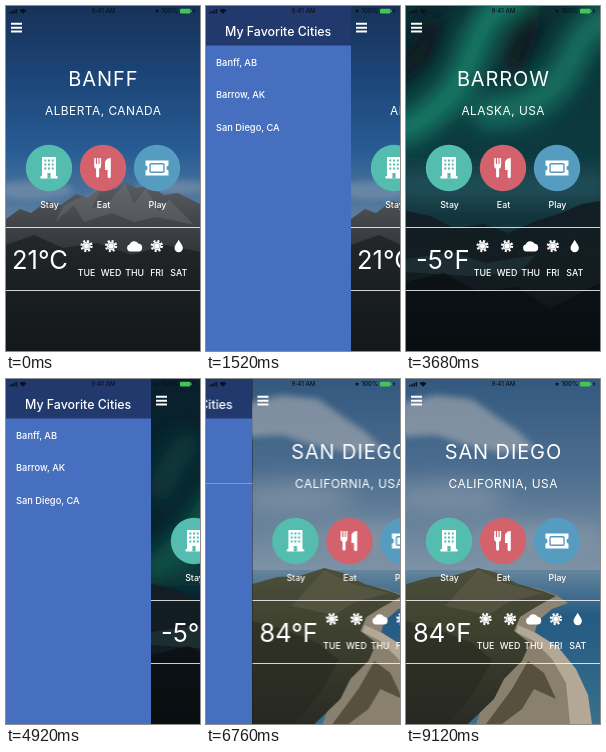
An HTML page that plays this animation: 194 px wide and 345 px high, repeating every 9.16 s.

```html
<!DOCTYPE html>
<html lang="en">
<head>
<meta charset="utf-8">
<title>City weather</title>
<style>
  html, body { margin: 0; width: 100%; height: 100%; overflow: hidden; background: #101820; }
  svg { display: block; width: 100vw; height: 100vh; }
  text { font-family: Inter, "Open Sans", sans-serif; fill: #fff; }
  .mid { text-anchor: middle; }
  .name { font-size: 20px; letter-spacing: .045em; }
  .region { font-size: 11.9px; letter-spacing: .04em; }
  .temp { font-size: 25.5px; }
  .small { font-size: 8.8px; font-weight: 500; }
  .title { font-size: 12.4px; font-weight: 500; }
  .row { font-size: 9.3px; font-weight: 500; }
  .status text { font-size: 6.2px; font-weight: 500; fill: #0a1220; }
</style>
</head>
<body>
<svg viewBox="0 0 194 345" preserveAspectRatio="none">
  <defs>
    <filter id="soft" x="-50%" y="-50%" width="200%" height="200%"><feGaussianBlur stdDeviation="11"/></filter>
    <filter id="haze" x="-20%" y="-20%" width="140%" height="140%"><feGaussianBlur stdDeviation="3"/></filter>
    <linearGradient id="alpineSky" x2="0" y2="1">
      <stop stop-color="#173258"/><stop offset=".2" stop-color="#1c4477"/>
      <stop offset=".42" stop-color="#285c94"/><stop offset=".6" stop-color="#5a7c9d"/>
    </linearGradient>
    <linearGradient id="rock" x2="0" y2="1">
      <stop stop-color="#5a5d62"/><stop offset=".3" stop-color="#3b3e42"/>
      <stop offset=".62" stop-color="#24282a"/><stop offset="1" stop-color="#131617"/>
    </linearGradient>
    <linearGradient id="night" x2="0" y2="1">
      <stop stop-color="#0b2e34"/><stop offset=".4" stop-color="#0c3a3e"/>
      <stop offset=".65" stop-color="#14323a"/><stop offset="1" stop-color="#0a1216"/>
    </linearGradient>
    <linearGradient id="shore" x2="0" y2="1">
      <stop stop-color="#121f26"/><stop offset=".5" stop-color="#131c20"/><stop offset="1" stop-color="#0a1013"/>
    </linearGradient>
    <linearGradient id="coastSky" x2="0" y2="1">
      <stop stop-color="#34597f"/><stop offset=".25" stop-color="#4a6c8e"/><stop offset=".55" stop-color="#7d92a5"/>
    </linearGradient>
    <linearGradient id="sea" x2="0" y2="1">
      <stop stop-color="#64859c"/><stop offset=".3" stop-color="#255a82"/><stop offset="1" stop-color="#37708c"/>
    </linearGradient>
    <linearGradient id="hill" x2="0" y2="1">
      <stop stop-color="#4c4f3c"/><stop offset=".4" stop-color="#3f412f"/><stop offset="1" stop-color="#2a2b24"/>
    </linearGradient>

    <g id="sun" fill="#fff">
      <circle r="4.2"/>
      <circle r="5" fill="none" stroke="#fff" stroke-width="2.3" stroke-dasharray="2 1.927"/>
      <circle r="3" fill="none" stroke="#000" stroke-opacity=".35" stroke-width=".8"/>
    </g>
    <path id="cloud" fill="#fff" d="M-4.5 5.5a3.6 3.6 0 0 1-.6-7A5 5 0 0 1 4-2.2a3.9 3.9 0 0 1 .4 7.7z"/>
    <path id="drop" fill="#fff" d="M0-6.2C1.5-3 4.2-.8 4.2 2A4.2 4.2 0 0 1-4.2 2C-4.2-.8-1.5-3 0-6.2z"/>
    <path id="burger" stroke="#fff" stroke-width="2" d="M5 17.8h11M5 21.7h11M5 25.6h11"/>

    <g id="Stay">
      <path fill="#fff" d="M-7-11H7v19H8.5v2.5H-8.5V8H-7z"/>
      <path stroke="#55bdb0" stroke-width="2" stroke-dasharray="2 1.7" d="M-4.7-7.5H4.7M-4.7-3.5H4.7M-4.7.5H4.7"/>
      <path fill="#55bdb0" d="M-1.6 5h3.2v5.5h-3.2z"/>
    </g>
    <g id="Eat" fill="#fff">
      <path d="M-8.6-10h1.5v6h1.1v-6h1.5v6h1.1v-6h1.5v7.5q0 2.5-2 3.2V8.6a1.6 1.6 0 0 1-3 0V.7q-2-.7-2-3.2z"/>
      <path d="M2-6q1.5-4 5.8-4V8.6a1.6 1.6 0 0 1-3.2 0V2H2z"/>
    </g>
    <g id="Play">
      <path fill="#fff" d="M-11.5-7.5h23v4.8a2.8 2.8 0 0 0 0 5.4v4.8h-23V2.7a2.8 2.8 0 0 0 0-5.4z"/>
      <rect x="-7" y="-4.3" width="14" height="8.6" rx="1" fill="none" stroke="#559cc0" stroke-width="1.4"/>
    </g>
  </defs>

  <g id="strip">
    <g class="city">
      <path fill="url(#alpineSky)" d="M0 0h194v345H0z"/>
      <g filter="url(#haze)" fill="#8da2b5" opacity=".45">
        <ellipse cx="25" cy="184" rx="42" ry="9"/><ellipse cx="168" cy="181" rx="38" ry="7"/>
      </g>
      <path fill="url(#rock)" d="M0 213 14 203 25 207 41 195 55 199 70 188 82 192 96 180 110 183 119 176 130 182 143 179 158 189 172 187 194 198V345H0z"/>
      <path fill="#777a7d" opacity=".35" d="M96 181 86 202 102 197 119 177 128 198 140 182 153 205 163 193 188 219 151 211 128 216 106 207 78 216 68 199 49 216 58 199z"/>
      <path fill="#15191b" opacity=".6" d="M0 239 28 229 57 242 91 237 126 249 160 239 194 246V345H0z"/>
    </g>
    <g class="city">
      <path fill="url(#night)" d="M0 0h194v345H0z"/>
      <g filter="url(#soft)" fill="none" stroke-linecap="round">
        <path stroke="#178069" stroke-width="27" d="M-5 125Q48 103 66 48T112-8"/>
        <path stroke="#147262" stroke-width="30" d="M80 106Q142 105 165 54T208 15"/>
        <path stroke="#07191f" stroke-width="24" d="M25 22Q14 60-14 67M124 12 108 58"/>
        <path stroke="#20505a" stroke-width="30" d="M0 180H194"/>
      </g>
      <g id="darkSky">
        <path fill="#08212c" d="M0 0h194v345H0z"/>
        <g filter="url(#soft)" fill="none" stroke-linecap="round">
          <path stroke="#0c5a48" stroke-width="26" d="M0 192Q34 168 55 134T128 48"/>
          <path stroke="#0a3d3c" stroke-width="24" d="M10 110Q22 80 36 66M20 195H194"/>
        </g>
      </g>
      <path fill="url(#shore)" d="M0 205 24 210 48 222 78 218 102 227 130 215 155 207 176 198 194 195V345H0z"/>
      <path fill="#294047" opacity=".45" d="M0 253 46 246 80 257 130 249 113 267 62 270 0 266z"/>
      <path fill="#080e11" opacity=".75" d="M0 276 38 267 72 286 112 281 143 303 194 277V345H0z"/>
    </g>
    <g class="city">
      <path fill="url(#coastSky)" d="M0 0h194v345H0z"/>
      <g filter="url(#haze)" fill="#a3a9b0" opacity=".65">
        <path d="M-5 24 30 16 66 20 88 36 112 52 130 70 96 74 60 66 30 56-5 58z"/>
      </g>
      <g filter="url(#soft)" fill="#a0a7b0" opacity=".45">
        <ellipse cx="42" cy="118" rx="60" ry="15"/><ellipse cx="132" cy="158" rx="72" ry="13"/>
      </g>
      <path fill="url(#sea)" d="M0 191h194v154H0z"/>
      <path fill="#8d8474" d="M100 206 130 209 150 216 162 224 146 230 132 242 128 256 106 256z"/>
      <path fill="#b3a896" d="M112 246 130 254 152 268 170 290 182 316 186 345H84z"/>
      <path fill="#8a806e" d="M104 250 128 262 146 280 160 304 164 345H70z"/>
      <path fill="url(#hill)" d="M0 205 25 198 47 197 72 189 91 194 112 205 137 212 150 217 130 228 114 238 108 252 124 264 116 282 98 300 88 320 62 345H0z"/>
      <path fill="#57503f" d="M122 282 138 294 150 320 128 310 116 330 96 345H80L106 310z"/>
      <path fill="#62604a" opacity=".5" d="M72 191 98 204 137 214 103 223 82 236 39 227z"/>
      <path fill="#26271f" opacity=".55" d="M0 242 31 250 66 264 86 281 69 312 42 345H0z"/>
    </g>
    <g id="menu">
      <path fill="#466fc0" d="M-145 0H0V345H-145z"/>
      <path fill="#21396d" d="M-145 0H0V39.5H-145z"/>
      <text class="title" x="-126" y="29.5">My Favorite Cities</text>
    </g>
  </g>

  <g class="status">
    <g fill="#0a1220">
      <path d="M3 6h1.5v1.5H3zM5.2 5h1.5v2.5H5.2zM7.4 4h1.5v3.5H7.4zM9.6 3h1.5v4.5H9.6z"/>
      <path d="M13.5 4.4Q17 1.2 20.5 4.4L17 7.8z"/>
      <circle cx="151" cy="5" r="1.5"/>
      <path d="M188.4 2.2 186.5 5.3H187.8L187.2 7.8 189.4 4.6H188z"/>
    </g>
    <text class="mid" x="97.5" y="7.4">9:41 AM</text>
    <text x="155.5" y="7.4">100%</text>
    <rect x="174" y="2.8" width="10.5" height="4.6" rx=".8" fill="#42c653"/>
    <path fill="#42c653" d="M185 4.2h.8v1.8h-.8z"/>
  </g>
</svg>
<script>
const LOOP = 9160, MENU_WIDTH = 145, CLOSING = 265;
const TO_BARROW = 2643, TO_SAN_DIEGO = 6600;
const $ = (selector) => document.querySelector(selector);

const cities = [
  { label: 'Banff, AB', name: 'BANFF', region: 'ALBERTA, CANADA', temp: '21°C', tempX: 6, shift: 0, from: 0, to: TO_BARROW },
  { label: 'Barrow, AK', name: 'BARROW', region: 'ALASKA, USA', temp: '-5°F', tempX: 10, shift: -4, from: TO_BARROW, to: TO_SAN_DIEGO },
  { label: 'San Diego, CA', name: 'SAN DIEGO', region: 'CALIFORNIA, USA', temp: '84°F', tempX: 7, shift: -1, from: TO_SAN_DIEGO, to: LOOP },
];
const actions = [['Stay', 43, '#55bdb0'], ['Eat', 97, '#d3626c'], ['Play', 151, '#559cc0']];
const days = [['TUE', 80.5, 'sun'], ['WED', 105, 'sun'], ['THU', 128.7, 'cloud'], ['FRI', 150.8, 'sun'], ['SAT', 172.7, 'drop']];

const text = (cls, x, y, value) => `<text class="${cls}" x="${x}" y="${y}">${value}</text>`;
const icon = (id, x, y) => `<use href="#${id}" x="${x}" y="${y}"/>`;

function screen({ name, region, temp, tempX, shift }) {
  const buttons = actions.map(([label, x, color]) =>
    `<circle cx="${x}" cy="162" r="23.2" fill="${color}"/>` + icon(label, x, 162) + text('small mid', x + 0.5, 202, label));
  const forecast = days.map(([day, x, sky]) =>
    icon(sky, x + shift, 240) + text('small mid', x + shift, 270, day));
  return icon('burger', 0, 0)
    + text('name mid', 97.4, 80.2, name) + text('region mid', 97.2, 109.3, region)
    + buttons.join('')
    + '<path stroke="#fff" stroke-opacity=".8" d="M0 221.5h194M0 284.5h194"/>'
    + text('temp', tempX, 263, temp) + forecast.join('');
}

function play(element, steps) {
  const frames = steps.map(([time, style, easing = 'linear']) => ({ offset: time / LOOP, easing, ...style }));
  element.animate(frames, { duration: LOOP, iterations: Infinity });
}

function showBetween(element, from, to) {
  const at = (time, opacity) => [time, { opacity }, 'step-end'];
  play(element, [at(0, from ? 0 : 1), at(from, 1), at(to, to < LOOP ? 0 : 1), at(LOOP, to < LOOP ? 0 : 1)]);
}

document.querySelectorAll('.city').forEach((group, i) => {
  group.insertAdjacentHTML('beforeend', screen(cities[i]));
  showBetween(group, cities[i].from, cities[i].to);
});

const menu = $('#menu');
cities.forEach(({ label, from }, i) => {
  menu.insertAdjacentHTML('beforeend', text('row', -135, 59.5 + i * 32.6, label));
  if (!from) return;
  menu.insertAdjacentHTML('beforeend', `<path stroke="#8a9bc2" d="M-145 ${39.5 + i * 32.5}H0"/>`);
  showBetween(menu.lastElementChild, from - 80, from + CLOSING);
});

const slide = (time, x) => [time, { transform: `translateX(${x}px)` }, 'ease-in-out'];
play($('#strip'), [
  slide(0, 0),
  slide(1290, 0), slide(1520, MENU_WIDTH),
  slide(TO_BARROW, MENU_WIDTH), slide(TO_BARROW + CLOSING, 0),
  slide(4500, 0), slide(4730, MENU_WIDTH),
  slide(TO_SAN_DIEGO, MENU_WIDTH), slide(TO_SAN_DIEGO + CLOSING, 0),
  slide(LOOP, 0),
]);

// The aurora brightens once the menu has closed and dims as it opens.
const fade = (time, opacity) => [time, { opacity }];
play($('#darkSky'), [fade(0, 1), fade(2900, 1), fade(3240, 0), fade(4500, 0), fade(4730, 1), fade(LOOP, 1)]);
</script>
</body>
</html>
```
